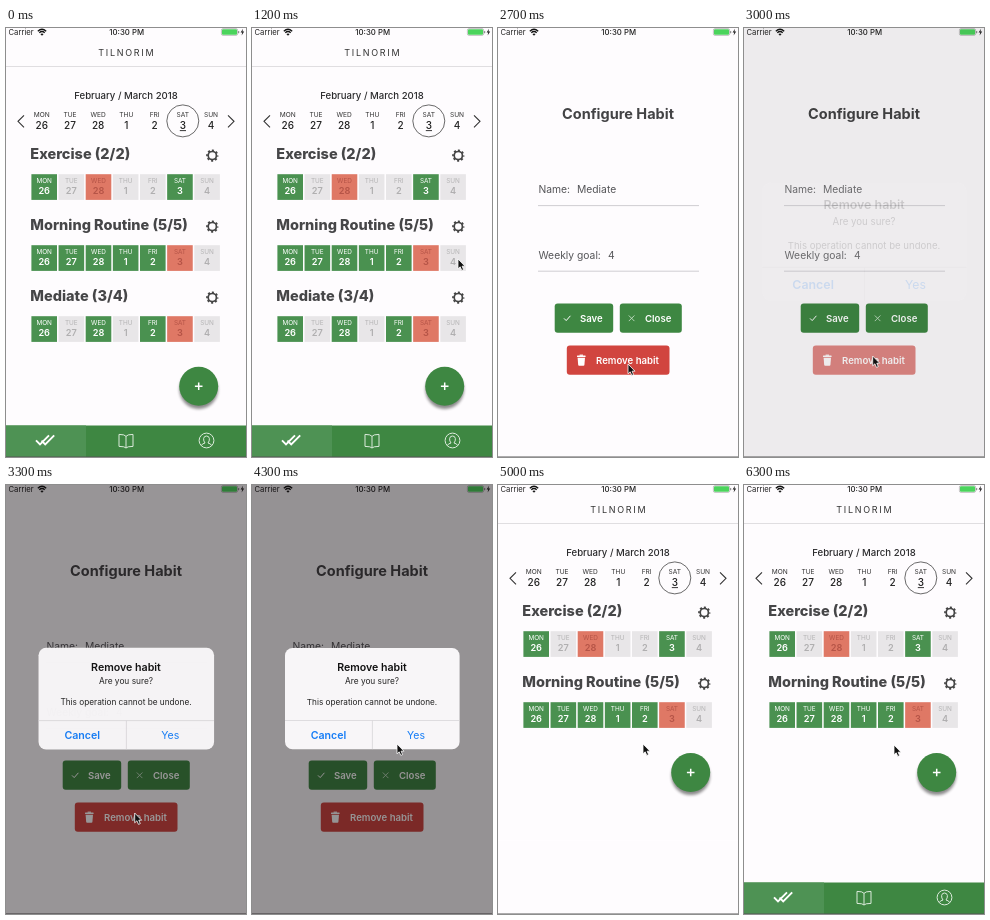
Write an HTML page that moves like this. It is 240x429 px and loops after 6.4 s.

```html
<!DOCTYPE html>
<html lang="en">
<head>
<meta charset="utf-8">
<title>Habit tracker</title>
<style>
  html, body { margin: 0; width: 100%; height: 100%; overflow: hidden; background: #fefcfe; }
  svg { display: block; width: 100vw; height: 100vh; }
  text { font-family: Inter, Roboto, sans-serif; }
</style>
</head>
<body>
<svg id="stage" viewBox="0 0 240 429"></svg>
<script>
const LOOP = 6400, STEP = 100;
const GREEN = '#3e8742', PAPER = '#fefcfe';
const DAYS = ['MON', 'TUE', 'WED', 'THU', 'FRI', 'SAT', 'SUN'];
const DATES = [26, 27, 28, 1, 2, 3, 4];

const text = (x, y, size, weight, fill, str, anchor = 'start', extra = '') =>
  `<text x="${x}" y="${y}" font-size="${size}" font-weight="${weight}" fill="${fill}" text-anchor="${anchor}" ${extra}>${str}</text>`;
const rect = (x, y, w, h, fill, extra = '') =>
  `<rect x="${x}" y="${y}" width="${w}" height="${h}" fill="${fill}" ${extra}/>`;
const line = (d, stroke, width, extra = '') =>
  `<path d="${d}" fill="none" stroke="${stroke}" stroke-width="${width}" ${extra}/>`;
const ring = (x, y, r, stroke, width, extra = '') =>
  `<circle cx="${x}" cy="${y}" r="${r}" fill="none" stroke="${stroke}" stroke-width="${width}" ${extra}/>`;

function gear(x, y) {
  const tooth = 2 * Math.PI * 5.3 / 16;
  return ring(x, y, 4.1, '#444', 1.7) +
    ring(x, y, 5.3, '#444', 1.7, `stroke-dasharray="${tooth} ${tooth}" stroke-dashoffset="${tooth / 2}"`);
}

// Marks: g = done, r = missed, - = empty
const CELL = {
  g: ['#4a9150', '#fff', '#fff'],
  r: ['#df7865', '#b55447', '#b55447'],
  '-': ['#e8e6e8', '#b4b3b4', '#b0afb0']
};

function habit(name, marks, row) {
  const y = 71 * row;
  const cells = [...marks].map((mark, i) => {
    const [fill, label, num] = CELL[mark];
    const x = 25.4 + 27.15 * i, mid = x + 12.8;
    return rect(x, y + 146.2, 25.6, 25.7, fill) +
      text(mid, y + 154.8, 6.4, 400, label, DAYS[i], 'middle') +
      text(mid, y + 165.5, 9.2, 600, num, DATES[i], 'middle');
  }).join('');
  return text(24.3, y + 131.1, 14.5, 800, '#464648', name) + gear(206.3, y + 127.6) + cells;
}

function statusBar() {
  return text(2.5, 7, 7.7, 400, '#222', 'Carrier') +
    line('M31.8 3.2Q36 -.6 40.2 3.2M33.3 4.8Q36 2.3 38.7 4.8', '#111', 1.3) +
    '<path d="M34.4 6L36 7.7L37.6 6Q36 4.8 34.4 6Z" fill="#111"/>' +
    text(120.7, 7, 7.8, 500, '#222', '10:30 PM', 'middle') +
    rect(215.4, .6, 16.2, 6.8, PAPER, 'rx="1.6" stroke="#888" stroke-width=".5"') +
    rect(216, 1.2, 15, 5.6, '#4bd45c', 'rx="1"') +
    rect(232.2, 2.9, 1, 2.4, '#777', 'rx=".5"') +
    '<path d="M237 .8L234.6 4.6H236.2L235.6 7.6L238.2 3.6H236.5Z" fill="#222"/>';
}

function weekStrip() {
  const days = DAYS.map((day, i) => {
    const x = 35.8 + 28.2 * i;
    return text(x, 88.7, 6.6, 400, '#333', day, 'middle') +
      text(x, 100.7, 10, 500, '#222', DATES[i], 'middle');
  }).join('');
  return text(120, 70.6, 9.6, 500, '#2a2a2c', 'February / March 2018', 'middle') + days +
    ring(176.8, 92.9, 16, '#444', .8) +
    line('M173.8 102.6H180', '#222', .9) +
    line('M18 87.3L12 93.3L18 99.3M222 87.3L228 93.3L222 99.3', '#333', 1.1);
}

function tabBar() {
  return rect(0, 397.5, 240, 31.5, GREEN) + rect(0, 397.5, 80, 31.5, '#4e9254') +
    line('M30 412.3L34 416.3L43 407.3M35.5 412.6L39.2 416.3L48.2 407.3', '#fff', 1.9) +
    line('M120 408.4Q119 406.4 113 406.4V418.4Q119 418.4 120 420Q121 418.4 127 418.4V406.4Q121 406.4 120 408.4V420', '#dcebdc', 1) +
    ring(200.5, 412.5, 7.4, '#dcebdc', 1) +
    line('M195.3 417.6Q196 415.6 199 415Q197.4 413 197.6 410.6Q198 408 200.5 408Q203 408 203.4 410.6Q203.6 413 202 415Q205 415.6 205.7 417.6', '#dcebdc', 1);
}

function home() {
  return rect(0, 0, 240, 429, PAPER) +
    text(120.8, 27.7, 9, 400, '#333', 'TILNORIM', 'middle', 'letter-spacing="1.7"') +
    rect(0, 38, 240, .8, '#d9d8da') + weekStrip() +
    habit('Exercise (2/2)', 'g-r--g-', 0) +
    habit('Morning Routine (5/5)', 'gggggr-', 1) +
    `<g id="last">${habit('Mediate (3/4)', 'g-g-gr-', 2)}</g>` +
    `<g id="add"><circle cx="192.7" cy="361.6" r="19.3" fill="#000" opacity=".45" filter="url(#soft)"/>
      <circle cx="192.7" cy="358.3" r="19.5" fill="${GREEN}"/>${line('M188.9 358.3H196.5M192.7 354.5V362.1', '#fff', 1.5)}</g>` +
    tabBar();
}

const field = (y, label, x, value) =>
  text(40.5, y, 10.3, 400, '#555558', label) + text(x, y, 10.3, 400, '#555558', value) +
  rect(40, y + 12.2, 161, .9, '#cac9cd');

const button = (x, y, w, fill, label, tx, icon) =>
  rect(x, y, w, 29.2, fill, 'rx="3"') + text(tx, y + 18, 9.6, 600, '#fff', label) + icon;

function form() {
  return rect(0, 0, 240, 429, PAPER) +
    text(120, 91, 14.5, 700, '#434345', 'Configure Habit', 'middle') +
    field(165, 'Name:', 79, 'Mediate') + field(230.5, 'Weekly goal:', 110, '4') +
    button(56.7, 275.6, 58.5, GREEN, 'Save', 82, line('M66 290.4L68.2 292.6L72.4 287.8', '#fff', 1)) +
    button(121.8, 275.6, 62, GREEN, 'Close', 147, line('M130.8 287.5L136.4 293.1M136.4 287.5L130.8 293.1', '#c5dfc6', .9)) +
    `<g id="remove">${button(68.8, 317.6, 102.7, '#d1453f', 'Remove habit', 98,
      rect(79, 327.6, 8.6, 1.4, '#fff', 'rx=".5"') + rect(81.6, 326.6, 3.4, 1.2, '#fff') +
      '<path d="M79.6 329.7H87L86.4 337Q86.3 337.8 85.5 337.8H81.1Q80.3 337.8 80.2 337Z" fill="#fff"/>')}</g>`;
}

function alertBox() {
  return rect(33, 163, 174.6, 101.2, '#f8f6f8', 'rx="7.5"') +
    '<path id="pressed" d="M120.5 235.5H207.6V256.7Q207.6 264.2 200.1 264.2H120.5Z" fill="#e9e7ea"/>' +
    text(120, 186, 10.6, 600, '#111', 'Remove habit', 'middle') +
    text(120, 199, 8.3, 400, '#222', 'Are you sure?', 'middle') +
    text(120, 219.8, 8.2, 400, '#222', 'This operation cannot be undone.', 'middle') +
    line('M33 235.5H207.6M120.4 235.5V264.2', '#d3d1d5', .7) +
    text(76.5, 254, 10.6, 600, '#147cf6', 'Cancel', 'middle') +
    text(164, 254, 10.5, 400, '#147cf6', 'Yes', 'middle');
}

const stage = document.getElementById('stage');
stage.innerHTML =
  `<defs><filter id="soft" x="-30%" y="-30%" width="160%" height="160%"><feGaussianBlur stdDeviation="1.7"/></filter></defs>
  ${home()}<g id="form">${form()}</g>${rect(0, 0, 240, 9, PAPER)}${statusBar()}
  ${rect(0, 428.2, 240, .8, '#555', 'opacity=".6"')}
  ${rect(0, 0, 240, 429, '#0a0508', 'id="dim"')}
  <g id="alert">${alertBox()}</g>
  <path id="cursor" d="M0 0V9.8L2.2 7.8L3.8 11.4L5.6 10.6L4.1 7.2H7Z" fill="#111" stroke="#fff" stroke-width=".8"/>`;

const part = {};
for (const id of ['last', 'add', 'form', 'remove', 'dim', 'alert', 'pressed', 'cursor'])
  part[id] = document.getElementById(id);

const set = (id, name, value) => part[id].setAttribute(name, value);
const show = (id, on) => set(id, 'visibility', on ? 'visible' : 'hidden');
const clamp = v => Math.max(0, Math.min(1, v));
const ease = v => v < .5 ? 2 * v * v : 1 - 2 * (1 - v) * (1 - v);

// Critically damped spring, 0 to 1
function spring(ms) {
  const x = Math.max(0, ms) * .016;
  return 1 - (1 + x) * Math.exp(-x);
}

// time, x, y
const PATH = [
  [700, 150, 208], [1200, 206, 231], [1300, 205, 252], [1400, 204.5, 267], [2100, 204.5, 268],
  [2500, 150, 360], [2700, 130, 336], [2800, 128.7, 328], [3400, 128.7, 328],
  [3800, 145, 259], [6200, 145, 259], [6300, 150, 260], [LOOP, 150, 260]
];

function cursorAt(t) {
  const i = Math.max(1, PATH.findIndex(p => p[0] > t));
  const [t0, x0, y0] = PATH[i - 1], [t1, x1, y1] = PATH[i];
  const k = clamp((t - t0) / (t1 - t0));
  return [x0 + (x1 - x0) * k, y0 + (y1 - y0) * k];
}

function draw(t) {
  const removed = t >= 4800;
  show('last', !removed);
  set('add', 'transform', `translate(0 ${removed ? -70.8 : 0})`);

  const up = removed ? 1 - spring(t - 4800) : spring(t - 1703);
  show('form', up > .001);
  set('form', 'transform', `translate(0 ${429 * (1 - up)})`);

  const press = ease(clamp((t - 2720) / 150)), release = ease(clamp((t - 2870) / 250));
  set('remove', 'opacity', 1 - .8 * press * (1 - release));

  const closing = t >= 4350;
  const level = closing ? 1 - spring(t - 4350) : spring(t - 2957);
  const scale = closing ? 1 : 1.2 - .2 * level;
  set('dim', 'opacity', .43 * level);
  show('alert', level > .002);
  set('alert', 'opacity', level);
  set('alert', 'transform', `translate(120 213) scale(${scale}) translate(-120 -213)`);
  set('pressed', 'opacity', t >= 4200 && t < 4300 ? 1 : 0);

  show('cursor', t >= 700);
  set('cursor', 'transform', `translate(${cursorAt(t)})`);
}

function tick() {
  const t = performance.now() % LOOP;
  draw(Math.floor(t / STEP) * STEP);
  requestAnimationFrame(tick);
}
tick();
</script>
</body>
</html>
```
